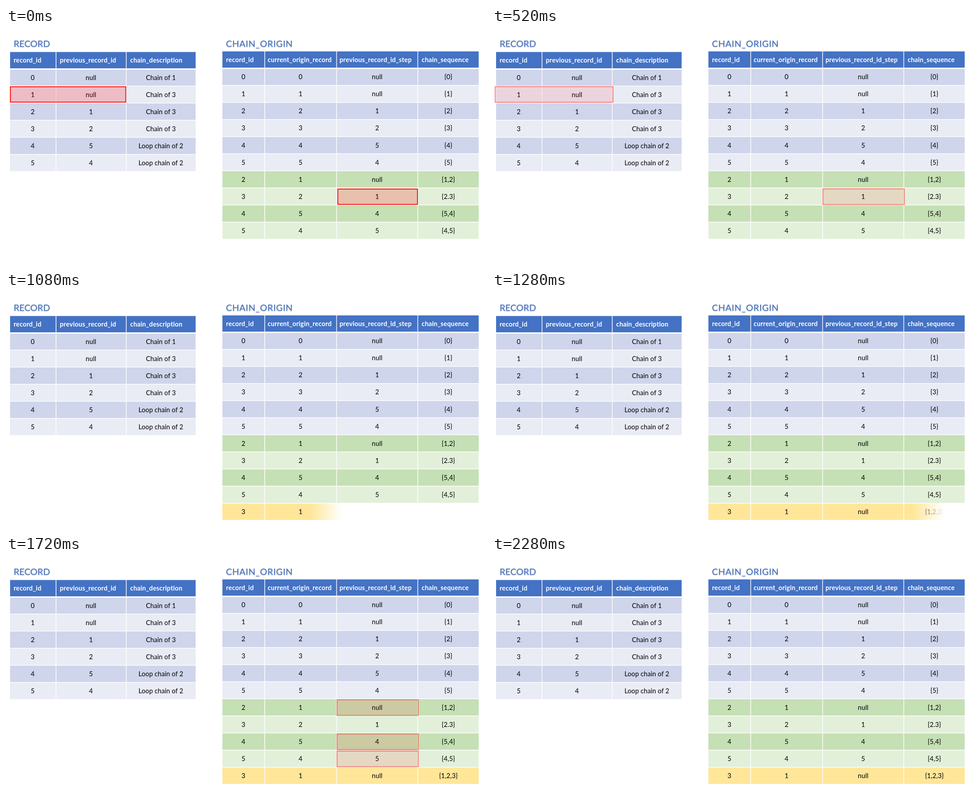
An HTML page for the animation above (6.06 s loop, 1065x526 px).

```html
<!DOCTYPE html>
<html lang="en">
<head>
<meta charset="utf-8">
<title>Chain origin</title>
<style>
  html, body { margin: 0; width: 100%; height: 100%; overflow: hidden; background: #fff; }
  svg { display: block; width: 1065px; height: 526px; }
  text { font-family: Lato, Carlito, "Open Sans", sans-serif; }
  .cell { font-size: 14.5px; letter-spacing: .1px; text-anchor: middle; }
  .head { font-size: 14.4px; font-weight: 700; letter-spacing: .2px; fill: #fff; }
  .title { font-size: 20px; fill: #4472c4; text-shadow: 0 1px 2px rgba(0, 0, 0, .35); }
  .mark { fill: #f00; fill-opacity: .2; stroke: #f00; stroke-width: 1.8; }
</style>
</head>
<body>
<svg id="stage" viewBox="0 0 1065 526">
  <defs>
    <linearGradient id="edge" gradientUnits="userSpaceOnUse" y1="0" y2="0">
      <stop offset="0" stop-color="#fff"/>
      <stop offset="1" stop-color="#000"/>
    </linearGradient>
    <mask id="wipe" maskUnits="userSpaceOnUse" x="0" y="0" width="1065" height="526">
      <rect width="1065" height="526" fill="url(#edge)"/>
    </mask>
  </defs>
</svg>
<script>
const stage = document.getElementById('stage');
const edge = document.getElementById('edge');
const LOOP = 6060, STEP = 40, ROW = 38.1, GAP = 0.75;
const BLUE = ['#cfd5ea', '#e9ebf5'], GREEN = ['#c5e0b4', '#e2f0d9'], YELLOW = '#ffe699';

function add(parent, tag, attrs, text) {
  const el = document.createElementNS('http://www.w3.org/2000/svg', tag);
  for (const key in attrs) el.setAttribute(key, attrs[key]);
  if (text !== undefined) el.textContent = text;
  return parent.appendChild(el);
}

function box(parent, x1, y1, x2, y2, fill) {
  add(parent, 'rect', { x: x1, y: y1, width: x2 - x1, height: y2 - y1, fill });
}

function drawHead(table) {
  const { edges, headTop, top, heads, headX } = table;
  heads.forEach((name, i) => {
    box(stage, edges[i] + GAP, headTop, edges[i + 1] - GAP, top - 1.3, '#4472c4');
    add(stage, 'text', { class: 'head', x: headX[i], y: headTop + 23.9 }, name);
  });
}

function drawRow(parent, table, index, fill, cells) {
  const { edges, top, centers } = table;
  const y = top + ROW * index;
  cells.forEach((value, i) => {
    box(parent, edges[i] + GAP, y + (index ? GAP : 1.6), edges[i + 1] - GAP, y + ROW - GAP, fill);
    add(parent, 'text', { class: 'cell', x: centers[i], y: y + 24.4 }, value);
  });
}

const record = {
  edges: [8.3, 111, 266.7, 421.5], headTop: 53.5, top: 91.2,
  centers: [59.3, 188.5, 343.6], headX: [17, 119.5, 275.5],
  heads: ['record_id', 'previous_record_id', 'chain_description']
};
const origin = {
  edges: [479.4, 574, 733.5, 913.6, 1049.5], headTop: 52.2, top: 89.7,
  centers: [526.7, 653.5, 823.5, 981.5], headX: [488.2, 580.5, 740, 922.3],
  heads: ['record_id', 'current_origin_record', 'previous_record_id_step', 'chain_sequence']
};

add(stage, 'text', { class: 'title', x: 17, y: 41.8 }, 'RECORD');
add(stage, 'text', { class: 'title', x: 488, y: 41.8, 'letter-spacing': .55 }, 'CHAIN_ORIGIN');
drawHead(record);
drawHead(origin);

const previous = ['null', 'null', 1, 2, 5, 4];
const about = ['Chain of 1', 'Chain of 3', 'Chain of 3', 'Chain of 3', 'Loop chain of 2', 'Loop chain of 2'];
previous.forEach((prev, i) => {
  drawRow(stage, record, i, BLUE[i % 2], [i, prev, about[i]]);
  drawRow(stage, origin, i, BLUE[i % 2], [i, i, prev, `{${i}}`]);
});
[
  [2, 1, 'null', '{1,2}'],
  [3, 2, 1, '{2.3}'],
  [4, 5, 4, '{5,4}'],
  [5, 4, 5, '{4,5}']
].forEach((cells, i) => drawRow(stage, origin, i + 6, GREEN[i % 2], cells));

const newRow = add(stage, 'g', { mask: 'url(#wipe)' });
drawRow(newRow, origin, 10, YELLOW, [3, 1, 'null', '{1,2,3}']);

function mark(cx, cy, w) {
  const h = 34.2;
  const el = add(stage, 'rect', { class: 'mark', x: -w / 2, y: -h / 2, width: w, height: h });
  return { el, cx, cy };
}
const stepMark = row => mark(824.6, origin.top + ROW * row + 19.6, 176.6);

// Each group pulses three times, then vanishes.
const PULSE = 291;
const groups = [
  { start: 0, marks: [mark(137.7, 148.1, 256), stepMark(7)] },
  { start: 1371, marks: [6, 8, 9].map(stepMark) }
];

function drawMarks({ start, marks }, t) {
  const beat = (t - start) / PULSE;
  const shown = beat >= 0 && beat < 3;
  const phase = beat - Math.floor(beat);
  const near = Math.min(phase, 1 - phase);
  const scale = 1 + 0.1 * near;
  const opacity = 1 - 0.5 * Math.min(1, near / 0.2);
  for (const { el, cx, cy } of marks) {
    el.setAttribute('visibility', shown ? 'visible' : 'hidden');
    el.setAttribute('transform', `translate(${cx} ${cy}) scale(${scale})`);
    el.setAttribute('opacity', opacity);
  }
}

// Soft-edged wipe from the left.
const WIPE = { start: 873, time: 498, soft: 71 };
function drawWipe(t) {
  const p = Math.min(1, Math.max(0, (t - WIPE.start) / WIPE.time));
  const lead = 480 + p * (570 + WIPE.soft);
  edge.setAttribute('x1', lead - WIPE.soft);
  edge.setAttribute('x2', lead);
  newRow.setAttribute('visibility', p > 0 ? 'visible' : 'hidden');
}

const begin = performance.now();
function draw() {
  const now = (performance.now() - begin) % LOOP;
  const t = Math.floor(now / STEP) * STEP;
  groups.forEach(group => drawMarks(group, t));
  drawWipe(t);
  requestAnimationFrame(draw);
}
draw();
</script>
</body>
</html>
```
